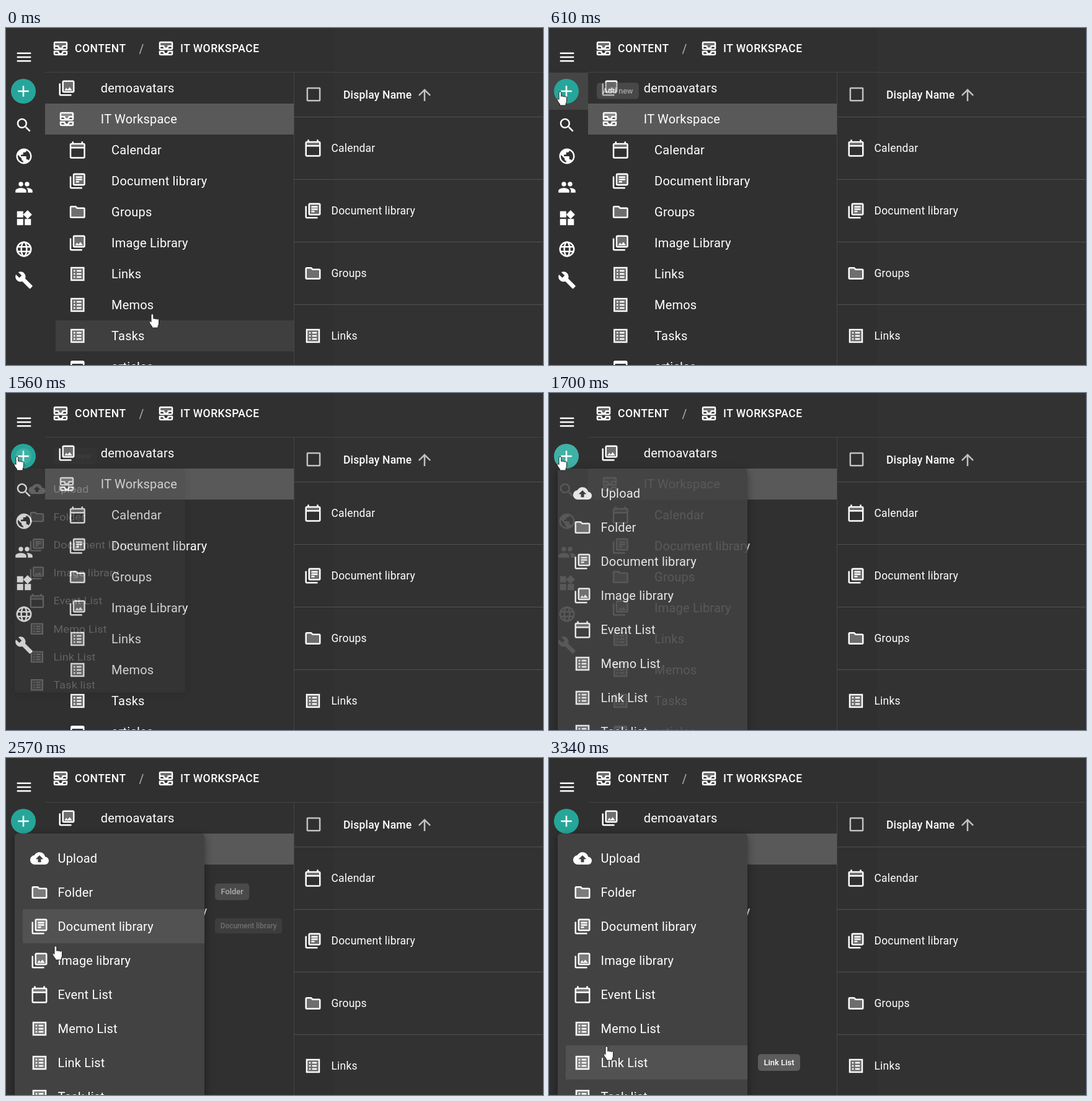
Animation of 866 by 544 pixels, one loop 3420 ms. Source, as an HTML page:

```html
<!DOCTYPE html>
<html lang="en">
<head>
<meta charset="utf-8">
<title>Add new menu</title>
<style>
html, body { margin: 0; width: 100%; height: 100%; overflow: hidden; background: #303030; }
svg { display: block; }
text { font: 400 20px Roboto, sans-serif; letter-spacing: .19px; fill: #fff; }
.cell { font-size: 17.5px; }
.head { font-size: 17.5px; font-weight: 500; }
.crumb { font-size: 17.5px; font-weight: 500; letter-spacing: .5px; }
.tip text { font-size: 13px; font-weight: 500; letter-spacing: 0; }
.panel { filter: drop-shadow(0 4px 7px rgba(0,0,0,.4)); }
.line { fill: none; stroke: #fff; stroke-width: 2; }
</style>
</head>
<body>
<svg id="stage" width="866" height="544" viewBox="0 0 866 544"></svg>
<script>
const LOOP = 3420;
const clamp = v => Math.max(0, Math.min(1, v));

// Icons on a 24 unit grid
const solid = d => `<path d="${d}"/>`;
const soft = d => `<path d="${d}" opacity=".3"/>`;
const line = d => `<path class="line" d="${d}"/>`;
const stack = soft('M8 4h12v12H8z') + solid('M4 6H2v14c0 1.1.9 2 2 2h14v-2H4zM20 2H8c-1.1 0-2 .9-2 2v12c0 1.1.9 2 2 2h12c1.1 0 2-.9 2-2V4c0-1.1-.9-2-2-2zm0 14H8V4h12z');
const folder = 'M3 6a1 1 0 0 1 1-1h5.6l2 2H20a1 1 0 0 1 1 1v10a1 1 0 0 1-1 1H4a1 1 0 0 1-1-1z';
const ICONS = {
  menu: line('M3 7h18M3 12h18M3 17h18'),
  add: line('M5 12h14M12 5v14'),
  search: solid('M15.5 14h-.79l-.28-.27C15.41 12.59 16 11.11 16 9.5 16 5.91 13.09 3 9.5 3S3 5.91 3 9.5 5.91 16 9.5 16c1.61 0 3.09-.59 4.23-1.57l.27.28v.79l5 4.99L20.49 19l-4.99-5zm-6 0C7.01 14 5 11.99 5 9.5S7.01 5 9.5 5 14 7.01 14 9.5 11.99 14 9.5 14z'),
  globe: solid('M12 2C6.48 2 2 6.48 2 12s4.48 10 10 10 10-4.48 10-10S17.52 2 12 2zm-1 17.93c-3.95-.49-7-3.85-7-7.93 0-.62.08-1.21.21-1.79L9 15v1c0 1.1.9 2 2 2v1.93zm6.9-2.54c-.26-.81-1-1.39-1.9-1.39h-1v-3c0-.55-.45-1-1-1H8v-2h2c.55 0 1-.45 1-1V7h2c1.1 0 2-.9 2-2v-.41c2.93 1.19 5 4.06 5 7.41 0 2.08-.8 3.97-2.1 5.39z'),
  people: solid('M16 11c1.66 0 3-1.34 3-3s-1.34-3-3-3-3 1.34-3 3 1.34 3 3 3zm-8 0c1.66 0 3-1.34 3-3S9.66 5 8 5 5 6.34 5 8s1.34 3 3 3zm0 2c-2.33 0-7 1.17-7 3.5V19h14v-2.5c0-2.33-4.67-3.5-7-3.5zm8 0c-.29 0-.62.02-.97.05 1.16.84 1.97 1.97 1.97 3.45V19h6v-2.5c0-2.33-4.67-3.5-7-3.5z'),
  widgets: solid('M13 13v8h8v-8zM3 21h8v-8H3zM3 3v8h8V3zm13.66-1.31L11 7.34 16.66 13l5.66-5.66z'),
  web: line('M4 9h16M4 15h16') + '<circle class="line" cx="12" cy="12" r="9"/><ellipse class="line" cx="12" cy="12" rx="3.5" ry="9"/>',
  wrench: solid('M22.7 19l-9.1-9.1c.9-2.3.4-5-1.5-6.9-2-2-5-2.4-7.4-1.3L9 6 6 9 1.6 4.7C.4 7.1.9 10.1 2.9 12.1c1.9 1.9 4.6 2.4 6.9 1.5l9.1 9.1c.4.4 1 .4 1.4 0l2.3-2.3c.5-.4.5-1.1.1-1.4z'),
  folder: soft(folder) + line(folder),
  calendar: soft('M4 5h16v3H4z') + solid('M20 3h-1V1h-2v2H7V1H5v2H4c-1.1 0-2 .9-2 2v16c0 1.1.9 2 2 2h16c1.1 0 2-.9 2-2V5c0-1.1-.9-2-2-2zm0 18H4V10h16zm0-13H4V5h16z'),
  books: stack + solid('M10 9h8v2h-8zm0 3h4v2h-4zm0-6h8v2h-8z'),
  photos: stack + solid('M11.5 11.67l1.69 2.26 2.48-3.1L19 15H9z'),
  list: soft('M5 5h14v14H5z') + line('M4 4h16v16H4z') + solid('M7 7h2v2H7zm0 4h2v2H7zm0 4h2v2H7zm4-8h6v2h-6zm0 4h6v2h-6zm0 4h6v2h-6z'),
  inbox: soft('M5 5h14v3h-5v1a2 2 0 0 1-4 0V8H5z') + solid('M19 3H5c-1.1 0-2 .9-2 2v7c0 1.1.9 2 2 2h14c1.1 0 2-.9 2-2V5c0-1.1-.9-2-2-2zM5 10h3.13c.21.78.67 1.47 1.27 2H5v-2zm14 2h-4.4c.6-.53 1.06-1.22 1.27-2H19v2zm0-4h-5v1c0 1.07-.93 2-2 2s-2-.93-2-2V8H5V5h14v3zm-5 7v1c0 .47-.19.9-.48 1.25-.37.45-.92.75-1.52.75s-1.15-.3-1.52-.75c-.29-.35-.48-.78-.48-1.25v-1H3v4c0 1.1.9 2 2 2h14c1.1 0 2-.9 2-2v-4h-7zm-9 2h3.13c.02.09.06.17.09.25.24.68.65 1.28 1.18 1.75H5v-2zm14 2h-4.4c.54-.47.95-1.07 1.18-1.75.03-.08.07-.16.09-.25H19v2z'),
  page: solid('M19 4H5c-1.1 0-2 .9-2 2v12c0 1.1.9 2 2 2h14c1.1 0 2-.9 2-2V6c0-1.1-.9-2-2-2zm0 14H5V8h14z'),
  cloud: solid('M19.35 10.04C18.67 6.59 15.64 4 12 4 9.11 4 6.6 5.64 5.35 8.04 2.34 8.36 0 10.91 0 14c0 3.31 2.69 6 6 6h13c2.76 0 5-2.24 5-5 0-2.64-2.05-4.78-4.65-4.96zM14 13v4h-4v-4H7l5-5 5 5z'),
  box: line('M4.5 3.9h15a.6.6 0 0 1 .6.6v15a.6.6 0 0 1-.6.6h-15a.6.6 0 0 1-.6-.6v-15a.6.6 0 0 1 .6-.6z'),
  up: solid('M4 12l1.41 1.41L11 7.83V20h2V7.83l5.58 5.59L20 12l-8-8z')
};

const SIDE = ['search', 'globe', 'people', 'widgets', 'web', 'wrench'];
const TREE = [['photos', 'demoavatars'], ['inbox', 'IT Workspace'], ['calendar', 'Calendar'],
  ['books', 'Document library'], ['folder', 'Groups'], ['photos', 'Image Library'],
  ['list', 'Links'], ['list', 'Memos'], ['list', 'Tasks'], ['page', 'articles']];
const TABLE = [['calendar', 'Calendar'], ['books', 'Document library'], ['folder', 'Groups'], ['list', 'Links']];
const MENU = [['cloud', 'Upload'], ['folder', 'Folder'], ['books', 'Document library'], ['photos', 'Image library'],
  ['calendar', 'Event List'], ['list', 'Memo List'], ['list', 'Link List'], ['list', 'Task list']];

// label, x, centre y, shown from, hidden from
const TIPS = [['Add new', 77, 101.5, 500, 1400], ['Upload', 337, 161, 2160, 2400],
  ['Folder', 337, 216, 2420, 2500], ['Document library', 337, 271, 2500, 2610],
  ['Image library', 337, 326, 2600, 2730], ['Event List', 337, 381, 2710, 2890],
  ['Memo List', 337, 436, 2855, 3050], ['Link List', 337, 491.5, 3130, 9999]];

// time, x, y of the fingertip
const PATH = [[-80, 241, 492], [0, 236, 462], [80, 215, 420], [160, 165, 330], [230, 105, 235],
  [310, 50, 160], [380, 37, 144], [460, 27, 123], [540, 20, 106], [610, 18, 103], [2010, 18, 103],
  [2090, 46, 138], [2160, 70, 158], [2250, 72, 161], [2330, 74, 180], [2480, 78, 252],
  [2560, 80, 304], [2640, 82, 352], [2720, 84, 375], [2800, 86, 400], [2870, 88, 433],
  [2950, 91, 455], [3030, 93, 466], [LOOP, 93, 466]];

const rect = (x, y, w, h, fill, more = '') => `<rect x="${x}" y="${y}" width="${w}" height="${h}" fill="${fill}" ${more}/>`;
const icon = (name, cx, cy, more = '') => `<g transform="translate(${cx - 15} ${cy - 15}) scale(1.25)" fill="#fff" ${more}>${ICONS[name]}</g>`;
const label = (s, x, y, cls = '') => `<text x="${x}" y="${y}" class="${cls}">${s}</text>`;

const treeRows = TREE.map(([ic, s], i) => {
  const cy = 97 + i * 50, dx = i > 1 ? 17.3 : 0;
  return icon(ic, 98 + dx, cy) + label(s, 152.8 + dx, cy + 7);
}).join('');
const tableRows = TABLE.map(([ic, s], i) => {
  const cy = 194 + i * 101;
  return rect(465, cy - 51, 401, 1, '#515151') + icon(ic, 495, cy) + label(s, 524.5, cy + 6, 'cell');
}).join('');
const menuRows = MENU.map(([ic, s], i) => {
  const cy = 162 + i * 55;
  return icon(ic, 54, cy) + label(s, 83.5, cy + 7);
}).join('');

const stage = document.getElementById('stage');
stage.innerHTML = rect(0, 0, 866, 544, '#303030') + rect(529, 0, 337, 544, '#323232') +
  rect(63, 71, 803, 1, '#434343') + rect(464, 72, 1, 472, '#464646') +
  rect(63, 122, 401, 50, '#595959') + rect(0, 0, 0, 0, '#454545', 'id="hover"') +
  icon('inbox', 88, 33) + label('CONTENT', 111, 39, 'crumb') +
  '<path d="M215.5 42l5.500-16" stroke="#a8a8a8" stroke-width="1.6"/>' +
  icon('inbox', 258, 33) + label('IT WORKSPACE', 281, 39, 'crumb') +
  icon('menu', 29, 47) + '<circle cx="28" cy="102" r="20" fill="#26a69a"/>' +
  '<circle id="ripple" cx="28" cy="102" r="20" fill="#fff"/>' + icon('add', 28, 102) +
  SIDE.map((ic, i) => icon(ic, 29, 157 + i * 50)).join('') + treeRows +
  icon('box', 496, 107, 'opacity=".7"') + label('Display Name', 544, 114, 'head') +
  icon('up', 675, 108, 'opacity=".7"') + tableRows +
  '<g id="menu">' + rect(14, 122, 306, 440, '#424242', 'rx="5" class="panel"') +
  rect(27, 0, 293, 55, '#525252', 'id="pick"') + menuRows + '</g>' +
  TIPS.map(([s]) => `<g class="tip">${rect(0, -13.5, 0, 27, '#616161', 'rx="5" opacity=".9"')}${label(s, 9.5, 4.5)}</g>`).join('') +
  '<path id="hand" fill="#fff" stroke="#1c1c1c" d="M-2 1.500a1.900 1.900 0 0 1 3.800 0V7.500a1.700 1.700 0 0 1 3 .5a1.600 1.600 0 0 1 3 .6a1.500 1.500 0 0 1 2.800 1.200V15c0 2-1.200 3-1.500 4.500V22H-.5V20c-1.500-2.500-3-3.500-4-6.500-.8-2.200 1-3 2.500-1z"/>';

const [hover, ripple, menu, pick, hand] = ['hover', 'ripple', 'menu', 'pick', 'hand'].map(id => document.getElementById(id));
const tips = [...document.querySelectorAll('.tip')];
const set = (el, o) => { for (const k in o) el.setAttribute(k, o[k]); };

function sizeTips() {
  for (const g of tips) set(g.firstChild, { width: g.lastChild.getComputedTextLength() + 19 });
}

const BEATS = [[0, 8], [610, 7], [1150, 7], [1700, 7], [2250, 7], [2800, 7], [3340, 1]];
const steps = BEATS.flatMap(([from, n], i) => {
  const to = i + 1 < BEATS.length ? BEATS[i + 1][0] : LOOP;
  return Array.from({ length: n }, (_, k) => Math.floor((from + (to - from) * k / n) / 10) * 10);
});

function pointAt(t) {
  const i = Math.max(1, PATH.findIndex(p => p[0] >= t));
  const [t0, x0, y0] = PATH[i - 1], [t1, x1, y1] = PATH[i];
  const k = clamp((t - t0) / (t1 - t0));
  return [x0 + (x1 - x0) * k, y0 + (y1 - y0) * k];
}

function hoverAt(t, x, y) {
  if (t > 1500) return [0, 0, 0, 0];
  if (x < 63) return y < 132 ? [0, 72, 63, 60] : [0, 132 + 50 * Math.floor((y - 132) / 50), 63, 50];
  return y < 172 ? [0, 0, 0, 0] : [80, 172 + 50 * Math.floor((y - 172) / 50), 384, 50];
}

function draw(t) {
  hand.setAttribute('transform', `translate(${pointAt(t)})`);

  // Highlights trail the pointer a little
  const [x, y] = pointAt(t - 70);
  const [hx, hy, width, height] = hoverAt(t, x, y);
  set(hover, { x: hx, y: hy, width, height, fill: hx ? '#3f3f3f' : '#454545' });
  const row = Math.floor((y - 134) / 55);
  set(pick, { y: 134 + 55 * row, opacity: t > 2000 && row >= 0 ? 1 : 0 });

  const open = clamp((t - 1480) / 250), grow = 1 - (1 - clamp((t - 1480) / 166)) ** 2;
  set(menu, {
    opacity: open,
    transform: `translate(14 122) scale(${.75 + .25 * grow} ${.5625 + .4375 * grow}) translate(-14 -122)`
  });
  const wave = clamp((t - 1380) / 250);
  set(ripple, { r: 20 * wave, opacity: .12 * (1 - clamp((t - 1700) / 200)) });

  TIPS.forEach(([, tx, ty, from, to], i) => {
    const show = clamp((t - from) / 200);
    const size = .75 + .25 * (1 - (1 - show) ** 3);
    set(tips[i], {
      opacity: Math.min(show, 1 - clamp((t - to) / 150)),
      transform: `translate(${tx} ${ty}) scale(${size})`
    });
  });
}

const start = performance.now();
function tick() {
  const t = (performance.now() - start) % LOOP;
  draw(steps.findLast(s => s <= t));
  requestAnimationFrame(tick);
}
sizeTips();
tick();
</script>
</body>
</html>
```
